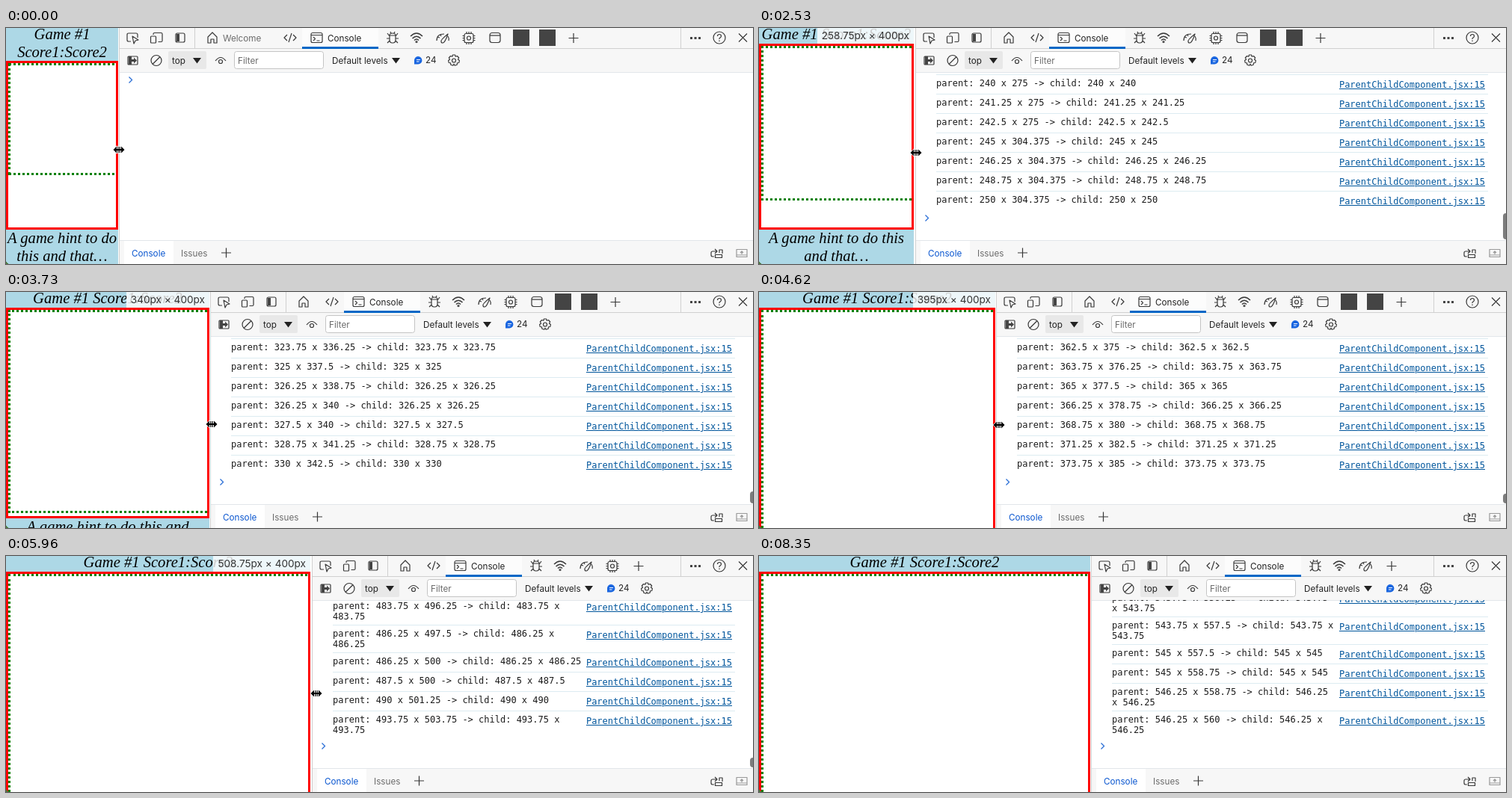
These frames come from a looping animation (999 by 316 pixels, 8.82 s). An HTML page:

```html
<!DOCTYPE html>
<html lang="en">
<head>
<meta charset="utf-8">
<title>Resizing a square child</title>
<style>
html, body { margin: 0; width: 100%; height: 100%; overflow: hidden; background: #fff; }
body { position: relative; }
#page {
  position: absolute; top: -2.6px; left: 0; min-height: 320px;
  display: flex; flex-direction: column; text-align: center; background: lightblue;
  font: italic 20.6px/23.5px "Liberation Serif", serif;
}
#box { flex: 1 0 auto; border: 3px solid red; background: #fff; overflow: hidden; }
#child { border: 3px dotted green; margin-bottom: 4px; }
#tip {
  position: absolute; top: 0; padding: 0 6px; white-space: nowrap;
  font: 13.6px/21px Inter, sans-serif; color: #333; background: rgba(255,255,255,.8);
}
#corner {
  position: absolute; left: 0; bottom: 0; width: 6px; height: 6px;
  background: radial-gradient(circle at 100% 0, transparent 6px, #4a7a3c 6.5px);
}
svg { position: absolute; left: 0; top: 0; }
svg text { font: 11.7px Inter, sans-serif; fill: #222; }
svg .dim { fill: #6b6b6b; }
.icon { fill: none; stroke: #383838; stroke-width: 1.2; stroke-linejoin: round; }
.solid { fill: #444; stroke: none; }
#log {
  position: absolute; top: 59px; right: 24px; height: 225px; overflow: hidden;
  font: 12px/14px "DejaVu Sans Mono", monospace; color: #1b1b1b;
}
.row {
  display: flex; margin-left: 24px; padding: 4px 0; min-height: 17px;
  border-top: 1px solid #dcebf1;
}
.row span { flex: 1; }
.row a {
  margin: 0 4px 0 5px; height: 17px; line-height: 19px;
  color: #00569c; text-decoration: underline;
}
#prompt { position: relative; height: 40px; }
#prompt svg { left: 8px; top: 5px; }
#thumb { position: absolute; left: 995px; bottom: calc(100% - 283px); width: 8px; border-radius: 4px; background: #7d7d7d; }
</style>
</head>
<body>
<div id="page">
  <div>Game #1 Score1:Score2</div>
  <div id="box"><div id="child"></div></div>
  <div>A game hint to do this and that…</div>
</div>
<div id="tip"></div>
<div id="corner"></div>

<svg width="999" height="316">
  <g id="panel">
    <path fill="#fff" d="M152 0h999v316h-999z"/>
    <path fill="#f7f7f7" d="M152 0h999v59h-999zM152 285h999v31h-999z"/>
    <path stroke="#d0d0d0" d="M151.5 0v316M252.5 0v27M152 27.5h999"/>
    <path stroke="#e2e6ea" d="M152 59.5h999M152 284.5h999"/>

    <g class="icon">
      <path d="M167 18h-3q-2 0-2-2V9q0-2 2-2h10q2 0 2 2v4M169 11l8 5-4 1-2 4z"/>
      <path d="M197 9V8q0-1.5 1.5-1.5h9q1.500 0 1.500 1.500v9q0 1.500-1.500 1.500h-4M194.500 11h5q1 0 1 1v7q0 1-1 1h-5q-1 0-1-1v-7q0-1 1-1z"/>
      <rect x="227" y="7" width="12" height="12" rx="2"/>
      <path d="M270 12l6-6 6 6v8h-4v-5h-4v5h-4z"/>
      <rect x="163" y="38" width="13" height="11" rx="1"/>
      <circle cx="201" cy="43.5" r="7"/><path d="M196 48.5l10-10"/>
      <path d="M280 44q7-9 14 0"/><circle cx="287" cy="45" r="2.5"/>
      <circle cx="599" cy="43.5" r="2.5"/>
      <path d="M597.5 36h3l.7 2.2 2.3-.7 2.2 2.5-1.3 2 2 1.5-.6 3-2.4.4-.2 2.3-3 1-1.2-2-1.2 2-3-1-.2-2.3-2.4-.4-.6-3 2-1.500-1.300-2 2.200-2.500 2.300.7z"/>
      <path d="M288 301h13M294.5 294.5v13"/>
    </g>
    <path class="solid" d="M228 8h4v10h-4zM164 38h4v11h-4zM168 42h3v-2.5l4 4-4 4V45h-3z"/>

    <rect x="217" y="31" width="51" height="24" rx="2" fill="#e8e8e8"/>
    <text x="222" y="48">top</text>
    <path fill="#222" d="M250 40h11l-5.5 7.5zM516 40h11l-5.5 7.5z"/>
    <rect x="305.5" y="31.5" width="119" height="23" rx="3" fill="#fff" stroke="#c4c4c4"/>
    <text x="310" y="48" class="dim">Filter</text>
    <text x="436" y="48">Default levels</text>
    <path fill="#1a66e0" d="M546 48.5V43a5.2 5.2 0 1 1 5.2 5.5z"/>
    <path stroke="#fff" d="M549 42.5h5M549 45h3.5"/>
    <text x="561" y="46.5">24</text>

    <path fill="#fff" d="M158 285h66v31h-66z"/>
    <text x="168" y="305.5" style="fill:#0b57d0">Console</text>
    <text x="234" y="305.5" class="dim">Issues</text>
  </g>

  <text id="welcome" y="17.5" class="dim">Welcome</text>
  <g id="tabs">
    <path fill="#fcfcfc" d="M396 0h102v27h-102z"/>
    <path fill="#0067c6" d="M396 25h102v3h-102z"/>
    <text x="430" y="17.5">Console</text>
    <g class="icon">
      <path d="M376 9l-4 4 4 4M384 9l4 4-4 4M382 7l-4 12"/>
      <rect x="408" y="6.5" width="15" height="13" rx="2"/>
      <path d="M408 9.5h15M411 12l2.5 2.5-2.5 2.5M415.5 17h4"/>
      <path d="M513 10q0-3 4-3t4 3v6q0 4-4 4t-4-4zM513 10h8M513 14h-4M521 14h4M513 11l-3-4M521 11l3-4M513 17l-3 3M521 17l3 3M515 7l-1-2M519 7l1-2"/>
      <path d="M541 11q8-8 16 0M543.5 14q5.5-5.5 11 0M546 16.5q3-3 6 0" stroke-width="1.5"/>
      <circle cx="549" cy="18.5" r="1"/>
      <path d="M576 17q0-9 10-9M591 11q2 3 1 6M577 12l3 1M581 9l1 2M582 18q-1-2 9-10-4 12-7 12-2 0-2-2z"/>
    </g>
    <g class="icon extra">
      <rect x="613" y="7.5" width="12" height="12" rx="2"/><circle cx="619" cy="13.5" r="2.5"/>
      <path d="M616 5v2.5M619 5v2.5M622 5v2.5M616 19.5v2.5M619 19.5v2.5M622 19.5v2.5M610.5 10.5h2.5M610.5 13.5h2.5M610.5 16.5h2.5M625 10.5h2.5M625 13.5h2.5M625 16.5h2.5"/>
    </g>
    <g class="icon extra"><rect x="647" y="6.5" width="14" height="13" rx="3"/><path d="M647 10h14"/></g>
    <rect class="solid extra" x="678" y="2" width="22" height="22"/>
    <rect class="solid extra" x="713" y="2" width="22" height="22"/>
  </g>
  <path id="plus" class="icon" d="M-6.5 13.5H6.5M0 7V20"/>

  <path stroke="#d0d0d0" d="M902.5 0v27"/>
  <path class="solid" d="M915 12h3v3h-3zM920.5 12h3v3h-3zM926 12h3v3h-3z"/>
  <g class="icon">
    <circle cx="954" cy="13" r="8"/>
    <path d="M951.5 11q0-2.5 2.5-2.5t2.5 2.5q0 1-1.5 2t-1 2M954 16.5v1.5M980 7.500l11 11M991 7.500l-11 11"/>
    <path d="M947 306h-2q-2 0-2-2v-3q0-2 2-2h5M948 296l3 3-3 3M948.5 303.5h9v4h-9zM954 301v-4h4v5"/>
    <path stroke="#999" d="M977 296.5h14v10h-14zM977 304h14M984 303v-4M982 301l2-2 2 2"/>
  </g>
</svg>

<div id="log"></div>
<div id="thumb"></div>
<svg width="999" height="316">
  <path id="cursor" stroke="#fff" stroke-width="1.2" paint-order="stroke"
    d="M-7.5 0l4.5-4.500v3.500h1.200v-3h1.200v3h1.200v-3h1.200v3h1.200v-3.500l4.500 4.500-4.500 4.500v-3.500h-1.200v3h-1.200v-3h-1.200v3h-1.200v-3h-1.200v3.500z"/>
</svg>

<script>
const $ = id => document.getElementById(id);
const LOOP = 8820, STEP = 149, LAST = 41;

// Console history: [child size, parent height]
const log = [];
const add = (c, h = c < 243 ? 275 : Math.max(304.375, c + 12.5)) => log.push([c, h]);
const fill = (from, to, by) => { for (let c = from; c <= to; c += by) add(c); };

// Drag path: step, page width, panel shift, log length, cursor x, cursor y
const keys = [];
const key = (step, width, shift, x, y) => keys.push([step, width, shift, log.length, x, y]);

key(-1, 150, 0, 151, 163);
fill(181.25, 198.75, 1.25);
key(4, 165, 15, 166, 164);
fill(200, 242.5, 1.25);
[245, 246.25, 248.75, 250].forEach(c => add(c));
key(12, 207, 58, 210, 167);
fill(251.25, 326.25, 1.25);
add(326.25, 340);
fill(327.5, 330, 1.25);
key(20, 272, 122, 275, 177);
fill(331.25, 366.25, 1.25);
add(368.75, 380); add(371.25, 382.5); add(373.75, 385);
key(26, 316, 166, 321, 178);
fill(376.25, 483.75, 2.5);
add(486.25, 497.5); add(486.25, 500); add(487.5, 500); add(490, 501.25); add(493.75, 503.75);
key(35, 407, 258, 415, 184);
fill(496.25, 543.75, 2.5);
add(543.75, 557.5); add(545, 557.5); add(545, 558.75); add(546.25, 558.75); add(546.25, 560);
key(LAST, 443, 293, 449, 186);

function pose(k) {
  const i = Math.max(1, keys.findIndex(p => p[0] >= k));
  const a = keys[i - 1], b = keys[i], f = (k - a[0]) / (b[0] - a[0]);
  return a.map((v, j) => Math.round(v + (b[j] - v) * f));
}

const row = ([c, h]) =>
  `<div class="row"><span>parent: ${c} x ${h} -&gt; child: ${c} x ${c}</span><a>ParentChildComponent.jsx:15</a></div>`;
const prompt = '<div id="prompt"><svg width="8" height="12"><path d="M1.5 1.5l4 4-4 4" fill="none" stroke="#2b6fd6" stroke-width="1.3"/></svg></div>';
const extras = [...document.querySelectorAll('.extra')];
const show = (el, on) => el.style.visibility = on ? 'visible' : 'hidden';
const move = (el, x, y = 0) => el.setAttribute('transform', `translate(${x} ${y})`);

function draw(k, rest) {
  const [, width, shift, count, x, y] = pose(k);
  $('page').style.width = width + 'px';
  $('child').style.width = $('child').style.height = width - 6 + 'px';

  $('tip').textContent = `${width * 1.25}px × 400px`;
  $('tip').style.right = `calc(100% - ${width}px)`;
  show($('tip'), k >= 0 && rest < 4);

  // The tab strip drops its label, then its last tabs, as room runs out
  const narrow = shift > 36, tabShift = shift - (narrow ? 66 : 0);
  const hidden = Math.max(0, Math.ceil((759 + tabShift - 870) / 35));
  move($('panel'), shift);
  move($('tabs'), tabShift);
  move($('plus'), 759 + tabShift - 35 * hidden);
  $('welcome').setAttribute('x', 290 + shift);
  show($('welcome'), !narrow);
  extras.forEach((el, i) => show(el, i < extras.length - hidden));

  const box = $('log');
  box.style.left = 155 + shift + 'px';
  box.innerHTML = log.slice(Math.max(0, count - 10), count).map(row).join('') + prompt;
  box.scrollTop = 9999;

  const total = 26 * count + 40;
  $('thumb').style.height = Math.max(13, 225 * 225 / total) + 'px';
  show($('thumb'), total > 225 && rest < 6);
  move($('cursor'), x, y + 2.2 * (rest + 1) ** 2);
}

const start = performance.now();
let state;
function tick() {
  const t = (performance.now() - start) % LOOP;
  const k = Math.max(-1, Math.min(LAST, Math.floor((t - 742) / STEP)));
  const rest = Math.max(-1, Math.min(7, Math.floor((t - 7302) / STEP)));
  if (state !== k + ':' + rest) {
    state = k + ':' + rest;
    draw(k, rest);
  }
  requestAnimationFrame(tick);
}
tick();
</script>
</body>
</html>
```
